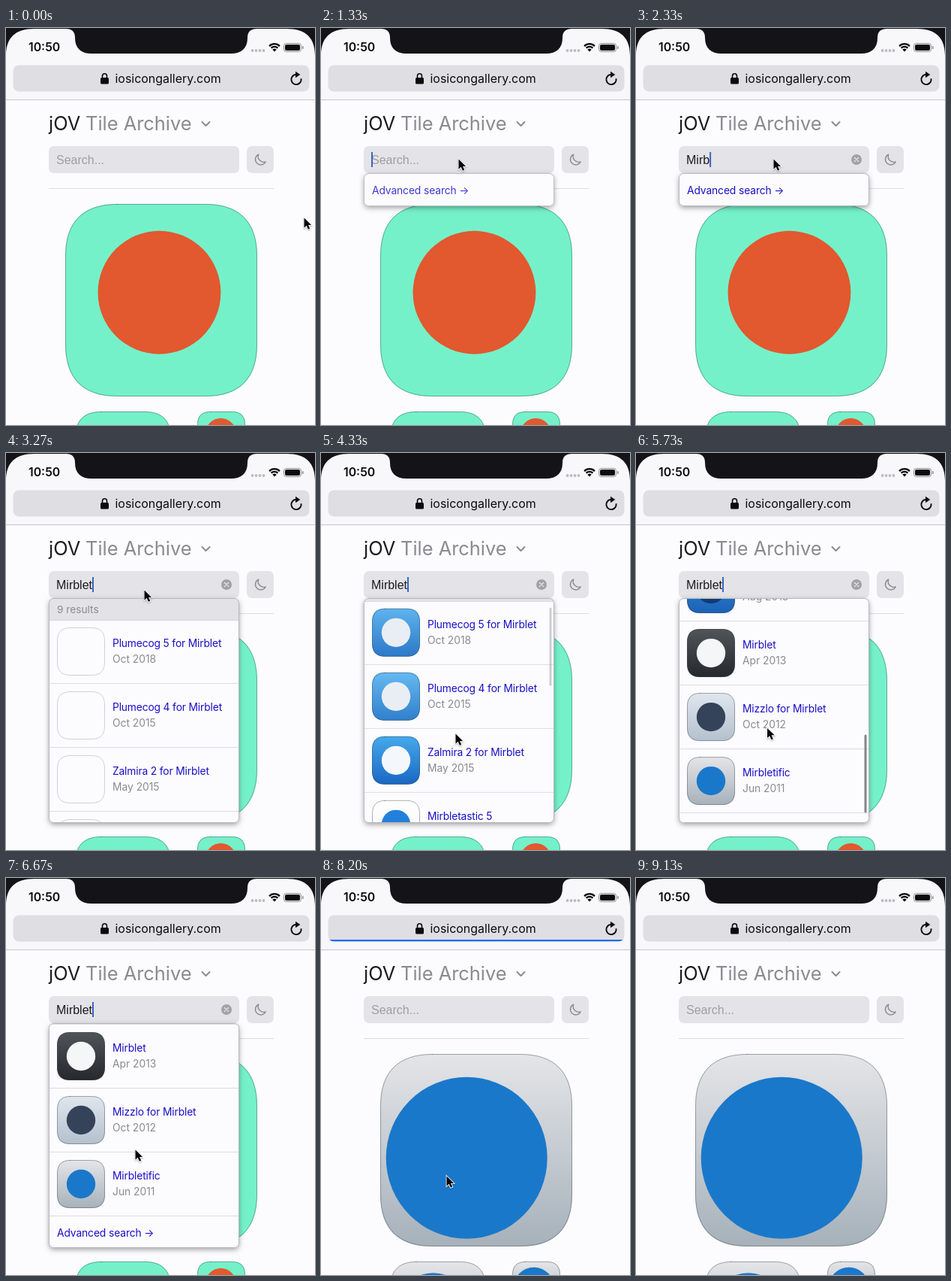
An HTML page with a canvas that plays this animation: 412 by 528 pixels, repeating every 9190 ms.

```html
<!DOCTYPE html>
<html lang="en">
<head>
<meta charset="utf-8">
<title>Icon search</title>
<style>
html, body { margin: 0; width: 100%; height: 100%; overflow: hidden; background: #fcfbfe; }
canvas { display: block; width: 412px; height: 528px; }
</style>
</head>
<body>
<canvas id="stage"></canvas>
<script>
const W = 412, H = 528, LOOP = 9190;
const canvas = document.getElementById('stage');
const ctx = canvas.getContext('2d');
const dpr = window.devicePixelRatio || 1;
canvas.width = W * dpr;
canvas.height = H * dpr;

const SANS = 'Inter, sans-serif';
const INPUT = '"Liberation Sans", Arial, sans-serif';
const GREY = '#8b8a8f', LINK = '#1a0fc4', FIELD = '#e4e3e7', PAPER = '#fcfbfe';
const QUERY = 'Mirblet';

// Times of the story, in ms
const OPEN = 1120, TYPE = 1750, KEY = 150, RESULTS = 3050, LOADED = 3450, PAGE = 7700;

const ROW = 85, LIST_TOP = 194, LIST_H = 298, HEAD = 28, FOOT = 43;

// Tile colours from top to bottom, then the plain disc on it
const rows = [
  ['Plumecog 5 for Mirblet', 'Oct 2018', '#5fb4ee', '#2b78c8', '#e9eef4'],
  ['Plumecog 4 for Mirblet', 'Oct 2015', '#66b9f0', '#2f7fcd', '#e9eef4'],
  ['Zalmira 2 for Mirblet', 'May 2015', '#46a9ea', '#1967c4', '#f4f8fc'],
  ['Mirbletastic 5', 'Apr 2015', '#ffffff', '#f4f5f7', '#2280dc'],
  ['Mirblet', 'Oct 2013', '#4f9ad6', '#3479b8', '#ffffff'],
  ['Glomme for Mirblet', 'Aug 2013', '#2f8be0', '#1c62b4', '#123a75'],
  ['Mirblet', 'Apr 2013', '#50555a', '#25282c', '#f5f6f7'],
  ['Mizzlo for Mirblet', 'Oct 2012', '#dfe6ee', '#b4c0ce', '#34435a'],
  ['Mirbletific', 'Jun 2011', '#e4e5e8', '#a6b1ba', '#1a78ca']
];
const mint = ['#75f1c9', '#75f1c9', '#e2582f'];

const clamp = v => Math.max(0, Math.min(1, v));
const ramp = (t, a, b) => clamp((t - a) / (b - a));
const smooth = p => p * p * (3 - 2 * p);
const settle = p => 1 - Math.pow(1 - p, 3);

// Pointer stops: time, x, y
const stops = [
  [0, 397, 252], [850, 183, 174], [2500, 183, 174], [3000, 184, 182],
  [3550, 184, 182], [4200, 179, 373], [5200, 179, 373], [6100, 172, 361],
  [6700, 172, 361], [7050, 167, 396], [8350, 167, 396], [8900, 425, 300]
];

function pointerAt(t) {
  let i = stops.length - 1;
  while (stops[i][0] > t) i--;
  const a = stops[i], b = stops[i + 1] || a;
  const p = a === b ? 0 : smooth(ramp(t, a[0], b[0]));
  return [a[1] + (b[1] - a[1]) * p, a[2] + (b[2] - a[2]) * p];
}

const scrollAt = t =>
  198 * settle(ramp(t, 4300, 5000)) + 339 * settle(ramp(t, 5200, 6150));

function text(str, x, y, size, color, weight = 400, family = SANS, spacing = 0) {
  ctx.font = `${weight} ${size}px ${family}`;
  ctx.letterSpacing = spacing + 'px';
  ctx.fillStyle = color;
  ctx.fillText(str, x, y);
  return ctx.measureText(str).width;
}

function box(x, y, w, h, r, fill) {
  ctx.beginPath();
  ctx.roundRect(x, y, w, h, r);
  ctx.fillStyle = fill;
  ctx.fill();
}

function disc(x, y, r, fill) {
  ctx.beginPath();
  ctx.arc(x, y, r, 0, 7);
  ctx.fillStyle = fill;
  ctx.fill();
}

function stroke(color, width, d) {
  ctx.strokeStyle = color;
  ctx.lineWidth = width;
  ctx.stroke(new Path2D(d));
}

function rule(x, y, w, color) {
  ctx.fillStyle = color;
  ctx.fillRect(x, y, w, 1);
}

function squircle(x, y, s) {
  const r = s * 0.27, c = r * 0.34, X = x + s, Y = y + s;
  ctx.beginPath();
  ctx.moveTo(x + r, y);
  ctx.lineTo(X - r, y);
  ctx.bezierCurveTo(X - c, y, X, y + c, X, y + r);
  ctx.lineTo(X, Y - r);
  ctx.bezierCurveTo(X, Y - c, X - c, Y, X - r, Y);
  ctx.lineTo(x + r, Y);
  ctx.bezierCurveTo(x + c, Y, x, Y - c, x, Y - r);
  ctx.lineTo(x, y + r);
  ctx.bezierCurveTo(x, y + c, x + c, y, x + r, y);
  ctx.closePath();
}

function tile(x, y, s, colors, cx, cy, r) {
  if (colors) {
    const g = ctx.createLinearGradient(0, y, 0, y + s);
    g.addColorStop(0, colors[0]);
    g.addColorStop(1, colors[1]);
    squircle(x, y, s);
    ctx.fillStyle = g;
    ctx.fill();
    disc(x + s * cx, y + s * cy, s * r, colors[2]);
  }
  squircle(x + 0.5, y + 0.5, s - 1);
  ctx.strokeStyle = colors ? 'rgba(60,70,75,.42)' : '#d0cfd3';
  ctx.lineWidth = 1;
  ctx.stroke();
}

function statusBar() {
  text('10:50', 30, 31, 15.8, '#0b0b0d', 600);
  for (let i = 0; i < 4; i++) disc(328.5 + i * 5, 30, 1.9, '#bdbcc1');

  ctx.lineCap = 'butt';
  [8.6, 5].forEach(r => {
    ctx.beginPath();
    ctx.arc(358, 31, r + 1.2, -Math.PI * 0.75, -Math.PI * 0.25);
    ctx.strokeStyle = '#0b0b0d';
    ctx.lineWidth = 2.3;
    ctx.stroke();
  });
  ctx.beginPath();
  ctx.moveTo(358, 31.5);
  ctx.arc(358, 31.5, 3.8, -Math.PI * 0.75, -Math.PI * 0.25);
  ctx.fillStyle = '#0b0b0d';
  ctx.fill();

  ctx.beginPath();
  ctx.roundRect(370.5, 20.5, 23, 11, 3.2);
  ctx.strokeStyle = '#8d8c91';
  ctx.lineWidth = 1;
  ctx.stroke();
  box(372, 22, 20, 8, 2, '#0b0b0d');
  box(395, 24, 1.6, 4, 1, '#8d8c91');
}

function addressBar(t) {
  ctx.save();
  ctx.beginPath();
  ctx.roundRect(9.5, 49.5, 395, 35, 8);
  ctx.clip();
  ctx.fillStyle = '#dfdee3';
  ctx.fillRect(9, 49, 396, 36);
  const done = 0.12 * settle(ramp(t, 7150, 7350)) + 0.5 * smooth(ramp(t, 7350, 7800))
    + 0.38 * settle(ramp(t, 7800, 8180));
  ctx.globalAlpha = 1 - ramp(t, 8280, 8520);
  ctx.fillStyle = '#0f6ff0';
  ctx.fillRect(9, 82, 396 * done, 2.5);
  ctx.restore();

  box(126, 66, 11, 8.5, 1.6, '#0b0b0d');
  stroke('#0b0b0d', 1.6, 'M128.5 66.5 V64 a3 3.2 0 0 1 6 0 V66.5');
  text('iosicongallery.com', 145.5, 73, 15.95, '#0b0b0d');

  ctx.beginPath();
  ctx.arc(387, 68.5, 6.6, -0.2, Math.PI * 1.55);
  ctx.strokeStyle = '#0b0b0d';
  ctx.lineWidth = 1.9;
  ctx.stroke();
  ctx.fillStyle = '#0b0b0d';
  ctx.fill(new Path2D('M386 57.8 L392.3 62 L386 66.2 Z'));
}

function chrome(t) {
  ctx.fillStyle = '#f8f7fa';
  ctx.fillRect(0, 0, W, 95);
  rule(0, 95, W, '#c6c5ca');
  statusBar();
  addressBar(t);
  ctx.fillStyle = '#141318';
  ctx.fill(new Path2D('M0 0H412V37C412 13 400 1 374 1H335C326 1 322 5 322 13' +
    'C322 27 314 34 300 34H114C100 34 92 27 92 13C92 5 88 1 80 1H38C12 1 0 13 0 37Z'));
}

function gallery(t) {
  text('jOV', 57, 136, 25.4, '#1c1c1e');
  text('Tile Archive', 106, 136, 25.4, GREY);
  ctx.lineCap = ctx.lineJoin = 'round';
  stroke(GREY, 2, 'M261.5 125 L266.5 130 L271.5 125');

  box(57, 157, 254, 36, 7, FIELD);
  box(321, 157, 36, 36, 7, FIELD);
  stroke(GREY, 1.4, 'M336.7 168.2 A7.2 7.2 0 1 0 346.2 177.8 A7.4 7.4 0 0 1 336.7 168.2 Z');
  rule(57, 213, 300, '#dddce0');

  const late = t >= PAGE;
  const look = late ? rows[8].slice(2) : mint;
  const place = late ? [0.45, 0.54, 0.42] : [0.49, 0.46, 0.32];
  tile(79, 234, 256, look, ...place);
  tile(92, 510, 128, look, ...place);
  tile(255, 510, 64, look, ...place);
}

function field(t) {
  const open = t >= OPEN && t < PAGE;
  const count = open ? Math.max(0, Math.min(QUERY.length, Math.floor((t - TYPE) / KEY) + 1)) : 0;
  let width = 0;
  if (count) {
    width = text(QUERY.slice(0, count), 67, 181, 16, '#1c1c1e', 400, INPUT);
    disc(294, 175, 7, '#a3a2a7');
    stroke(FIELD, 1.4, 'M291.4 172.4 l5.2 5.2 M296.6 172.4 l-5.2 5.2');
  } else {
    text('Search...', 67, 181, 16, '#9f9ea3', 400, INPUT);
  }
  if (open) {
    ctx.fillStyle = '#3568c8';
    ctx.fillRect(67 + width, 165, 2, 20);
  }
}

function advanced(y) {
  text('Advanced search →', 68, y + 26.5, 13.8, LINK, 400, SANS, -0.1);
}

function results(t) {
  const scroll = scrollAt(t);
  let y = LIST_TOP - scroll;
  ctx.fillStyle = '#e3e2e6';
  ctx.fillRect(57, y, 254, HEAD);
  rule(57, y + HEAD, 254, '#d8d7db');
  text('9 results', 68, y + 19, 13.7, GREY);

  y += HEAD;
  rows.forEach(([name, date, ...colors], i) => {
    const ready = t > LOADED + i * 45;
    tile(68, y + 10, 64, ready ? colors : null, 0.5, 0.5, 0.3);
    text(name, 142, y + 36, 13.8, LINK, 400, SANS, -0.15);
    text(date, 142, y + 57, 13.8, GREY);
    y += ROW;
    rule(57, y - 1, 254, '#dddce0');
  });
  advanced(y);

  const total = HEAD + rows.length * ROW + FOOT;
  ctx.globalAlpha = ramp(t, 4300, 4380) * (1 - ramp(t, 6350, 6600));
  box(304.5, 197 + scroll / total * 292, 3, 292 * LIST_H / total, 1.5, '#858489');
  ctx.globalAlpha = 1;
}

function dropdown(t) {
  if (t < OPEN || t >= PAGE) return;
  const full = t >= RESULTS;
  const h = full ? LIST_H : FOOT;
  ctx.save();
  // The panel turns solid first, its content follows
  ctx.globalAlpha = ramp(t, OPEN, OPEN + 150);
  ctx.shadowColor = 'rgba(0,0,0,.38)';
  ctx.shadowBlur = 7 * dpr;
  ctx.shadowOffsetY = 2 * dpr;
  box(57.5, LIST_TOP, 253, h, 6, PAPER);
  ctx.shadowColor = 'transparent';
  ctx.globalAlpha = settle(ramp(t, OPEN, OPEN + 480));
  ctx.save();
  ctx.beginPath();
  ctx.roundRect(57.5, LIST_TOP, 253, h, 6);
  ctx.clip();
  if (full) results(t);
  else advanced(LIST_TOP);
  ctx.restore();
  ctx.beginPath();
  ctx.roundRect(57.5, LIST_TOP - 0.5, 253, h, 6);
  ctx.strokeStyle = '#b9b8bd';
  ctx.lineWidth = 1;
  ctx.stroke();
  ctx.restore();
}

const arrow = new Path2D('M0 0V15.2L3.6 11.9L6.2 17.6L8.9 16.4L6.4 10.8H11Z');

function pointer(t) {
  const [x, y] = pointerAt(t);
  ctx.save();
  ctx.translate(x + 0.5, y + 0.5);
  ctx.scale(0.87, 0.87);
  ctx.shadowColor = 'rgba(0,0,0,.3)';
  ctx.shadowBlur = 2 * dpr;
  ctx.shadowOffsetY = dpr;
  ctx.lineJoin = 'miter';
  ctx.strokeStyle = '#fff';
  ctx.lineWidth = 2;
  ctx.stroke(arrow);
  ctx.shadowColor = 'transparent';
  ctx.fillStyle = '#060607';
  ctx.fill(arrow);
  ctx.restore();
}

function draw(t) {
  ctx.setTransform(dpr, 0, 0, dpr, 0, 0);
  ctx.globalAlpha = 1;
  ctx.fillStyle = PAPER;
  ctx.fillRect(0, 0, W, H);
  gallery(t);
  field(t);
  dropdown(t);
  chrome(t);
  pointer(t);
}

const start = performance.now();
function tick() {
  draw((performance.now() - start) % LOOP);
  requestAnimationFrame(tick);
}
tick();
</script>
</body>
</html>
```
